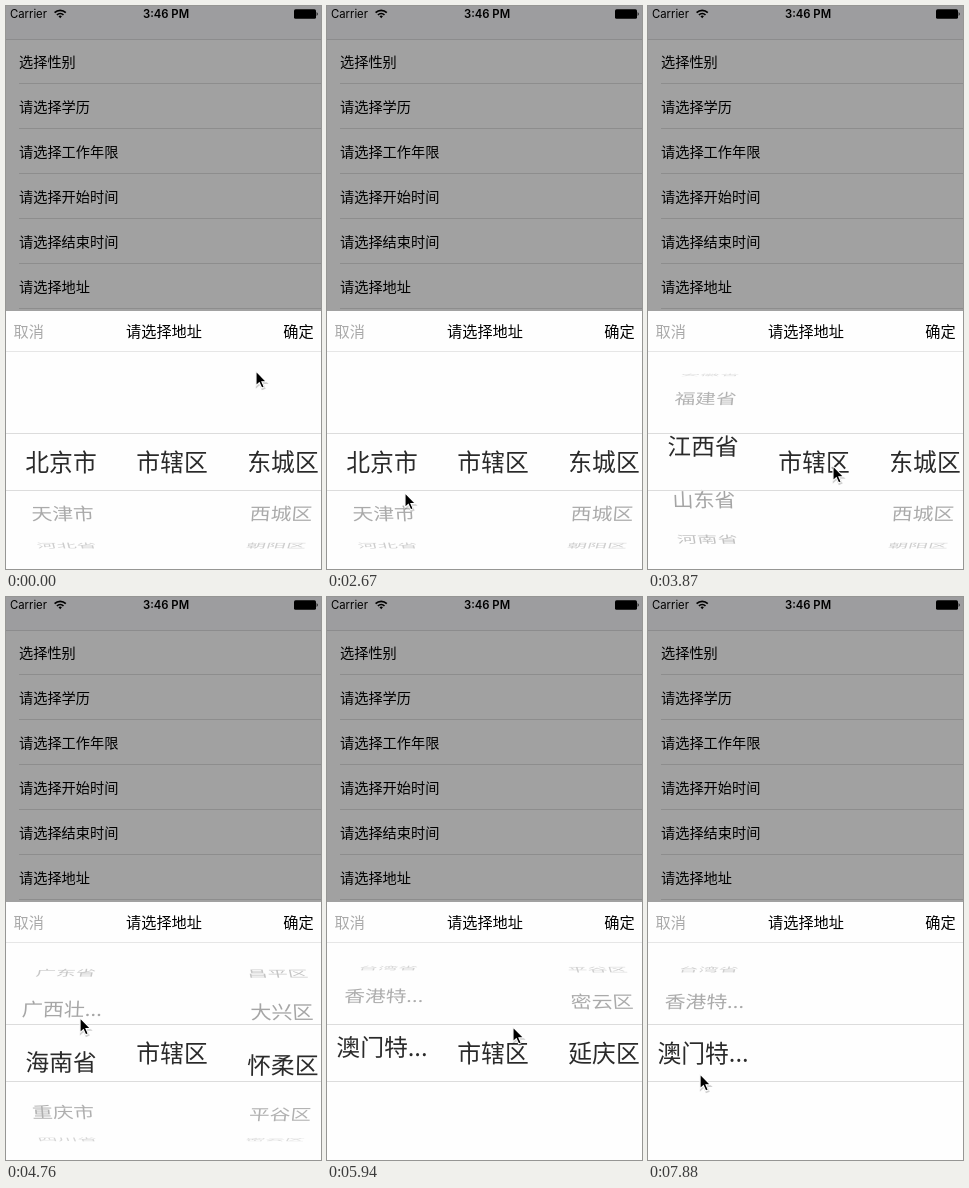
These frames come from a looping animation (315x563 px, 8000 ms). An HTML page:

```html
<!DOCTYPE html>
<html lang="zh-CN">
<head>
<meta charset="utf-8">
<style>
html, body { margin: 0; width: 100%; height: 100%; overflow: hidden; background: #fff; }
svg { display: block; width: 315px; height: 563px; font-family: "Noto Sans CJK SC", "Noto Sans CJK", sans-serif; }
.status { font-family: Inter, Roboto, sans-serif; font-size: 11.3px; }
</style>
</head>
<body>
<svg viewBox="0 0 315 563">
  <defs>
    <clipPath id="inside"><rect y="428" width="315" height="56"/></clipPath>
    <clipPath id="outside"><path d="M0 346H315V428H0zM0 485H315V563H0z"/></clipPath>
  </defs>
  <rect width="315" height="563" fill="#a1a1a1"/>
  <rect width="315" height="33" fill="#9d9d9f"/>
  <rect y="33" width="315" height="1" fill="#8c8c8d"/>
  <g class="status">
    <text x="4" y="12">Carrier</text>
    <text x="160" y="12" text-anchor="middle" font-weight="600">3:46 PM</text>
  </g>
  <g fill="none" stroke="#000" stroke-width="1.7">
    <path d="M48.6 6.6a8 8 0 0 1 11.2 0M50.9 9a4.8 4.8 0 0 1 6.6 0"/>
    <path d="M54.2 12.2l-1.7-1.9a2.5 2.5 0 0 1 3.4 0z" fill="#000" stroke="none"/>
    <rect x="288" y="3.2" width="22" height="9.6" rx="1.6" fill="#000" stroke="none"/>
    <path d="M310.7 6q2 2 0 4z" fill="#000" stroke="none"/>
  </g>
  <g id="list"></g>
  <rect y="305" width="315" height="258" fill="#fefefe"/>
  <rect y="345" width="315" height="1" fill="#e6e6e6"/>
  <g id="header"></g>
  <g id="small" clip-path="url(#outside)"></g>
  <g id="large" clip-path="url(#inside)"></g>
  <path d="M0 427.5H315M0 484.5H315" stroke="#dcdcdc"/>
  <g id="cursor">
    <path d="M.5 1.5V16l3.3-3 2.4 5.3 2.5-1.1-2.3-5.1h4.4z" opacity=".18" stroke="#000" stroke-width="1.5"/>
    <path d="M0 0V14.6l3.3-3 2.4 5.3 2.5-1.1-2.3-5.1h4.6z" stroke="#fff" stroke-width="1.1"/>
  </g>
</svg>
<script>
const $ = id => document.getElementById(id);

function add(parent, tag, attrs, content = '') {
  const node = document.createElementNS('http://www.w3.org/2000/svg', tag);
  for (const key in attrs) node.setAttribute(key, attrs[key]);
  node.textContent = content;
  parent.appendChild(node);
  return node;
}

// Vertically centred text: ideographs sit .38em above the baseline.
const label = (parent, str, x, y, size, attrs = {}) =>
  add(parent, 'text', { x, y: y + size * .38, 'font-size': size, ...attrs }, str);

['选择性别', '请选择学历', '请选择工作年限', '请选择开始时间', '请选择结束时间', '请选择地址'].forEach((str, i) => {
  label($('list'), str, 13, 55.6 + 45 * i, 14.2);
  add($('list'), 'rect', { x: 13, y: 77 + 45 * i, width: 302, height: 1, fill: '#8d8d8d' });
});
label($('header'), '取消', 7.5, 325.2, 15.2, { fill: '#a9a9a9' });
label($('header'), '请选择地址', 158, 325.2, 15.2, { 'text-anchor': 'middle' });
label($('header'), '确定', 307.7, 325.2, 15.2, { 'text-anchor': 'end' });

const provinces = ('北京市 天津市 河北省 山西省 内蒙古... 辽宁省 吉林省 黑龙江省 上海市 江苏省 浙江省 安徽省 ' +
  '福建省 江西省 山东省 河南省 湖北省 湖南省 广东省 广西壮... 海南省 重庆市 四川省 贵州省 云南省 西藏自... ' +
  '陕西省 甘肃省 青海省 宁夏回... 新疆维... 台湾省 香港特... 澳门特...').split(' ');
const districts = '东城 西城 朝阳 丰台 石景山 海淀 门头沟 房山 通州 顺义 昌平 大兴 怀柔 平谷 密云 延庆'
  .split(' ').map(name => name + '区');

// Each flick: start ms, duration ms, rows travelled.
const wheels = [
  { x: 55, rows: provinces, flicks: [[2700, 300, 1], [3015, 1900, 19], [4900, 850, 13.3], [5750, 450, -.3]] },
  { x: 166, rows: ['市辖区'], end: 6240, flicks: [[1400, 150, .3], [1550, 250, -.3]] },
  { x: 277, rows: districts, end: 6240,
    flicks: [[1640, 440, 2.2], [2080, 440, -2.2], [4060, 964, 13], [5350, 400, 2]] }
];

// Pointer stops: ms, x, y.
const stops = [[0, 250, 365], [750, 267, 519], [1050, 267, 519], [1340, 175, 502], [1700, 264, 495],
  [2080, 266, 400], [2670, 78, 487], [3250, 84, 378], [3870, 185, 460], [4310, 302, 330], [4760, 74, 421],
  [5350, 270, 470], [5620, 300, 312], [5940, 186, 430], [6690, 165, 455], [7280, 138, 534], [7880, 52, 477]];

const clamp = p => Math.min(1, Math.max(0, p));
const easeOut = p => Math.sin(p * Math.PI / 2);
const easeInOut = p => p * p * (3 - 2 * p);

for (const wheel of wheels) {
  wheel.nodes = wheel.rows.map(str => [
    label($('small'), str, 0, 0, 21.2, { 'text-anchor': 'middle' }),
    label($('large'), str, 0, 0, 23.8, { 'text-anchor': 'middle', fill: '#2a2a2a' })
  ]);
}

const RADIUS = 88, STEP = Math.PI / 5, DEPTH = .085, MID = 157.5;

// Rows lie on a cylinder seen in slight perspective from the middle of the stage.
function drawWheel({ x, flicks, nodes, end = Infinity }, t) {
  const position = flicks.reduce((sum, [start, span, rows]) => sum + rows * easeOut(clamp((t - start) / span)), 0);
  nodes.forEach((pair, i) => {
    const angle = (i - position) * STEP;
    const visible = t < end && Math.abs(angle) < 1.54;
    const sin = Math.sin(angle), cos = Math.cos(angle);
    const scale = 1 / (1 + DEPTH * (1 - cos));
    const skew = (MID - x) * DEPTH * sin * scale * scale / RADIUS;
    for (const node of pair) {
      node.style.display = visible ? '' : 'none';
      node.setAttribute('transform',
        `matrix(${scale} 0 ${skew} ${cos} ${MID + (x - MID) * scale} ${456 + RADIUS * sin})`);
    }
    pair[0].setAttribute('fill-opacity', .11 + .27 * Math.max(0, cos));
  });
}

function moveCursor(t) {
  const next = Math.max(1, stops.findIndex(stop => stop[0] > t));
  const [t0, x0, y0] = stops[next - 1], [t1, x1, y1] = stops[next];
  const p = easeInOut(clamp((t - t0) / (t1 - t0)));
  $('cursor').setAttribute('transform', `translate(${x0 + (x1 - x0) * p} ${y0 + (y1 - y0) * p})`);
}

const LOOP = 8000, TICK = 148.3;

// The picture is held for one tick at a time.
function render(now) {
  const t = Math.floor(now % LOOP / TICK) * TICK;
  for (const wheel of wheels) drawWheel(wheel, t + 10);
  moveCursor(t + 10);
}

const start = performance.now();
function loop() {
  render(performance.now() - start);
  requestAnimationFrame(loop);
}
loop();
</script>
</body>
</html>
```
